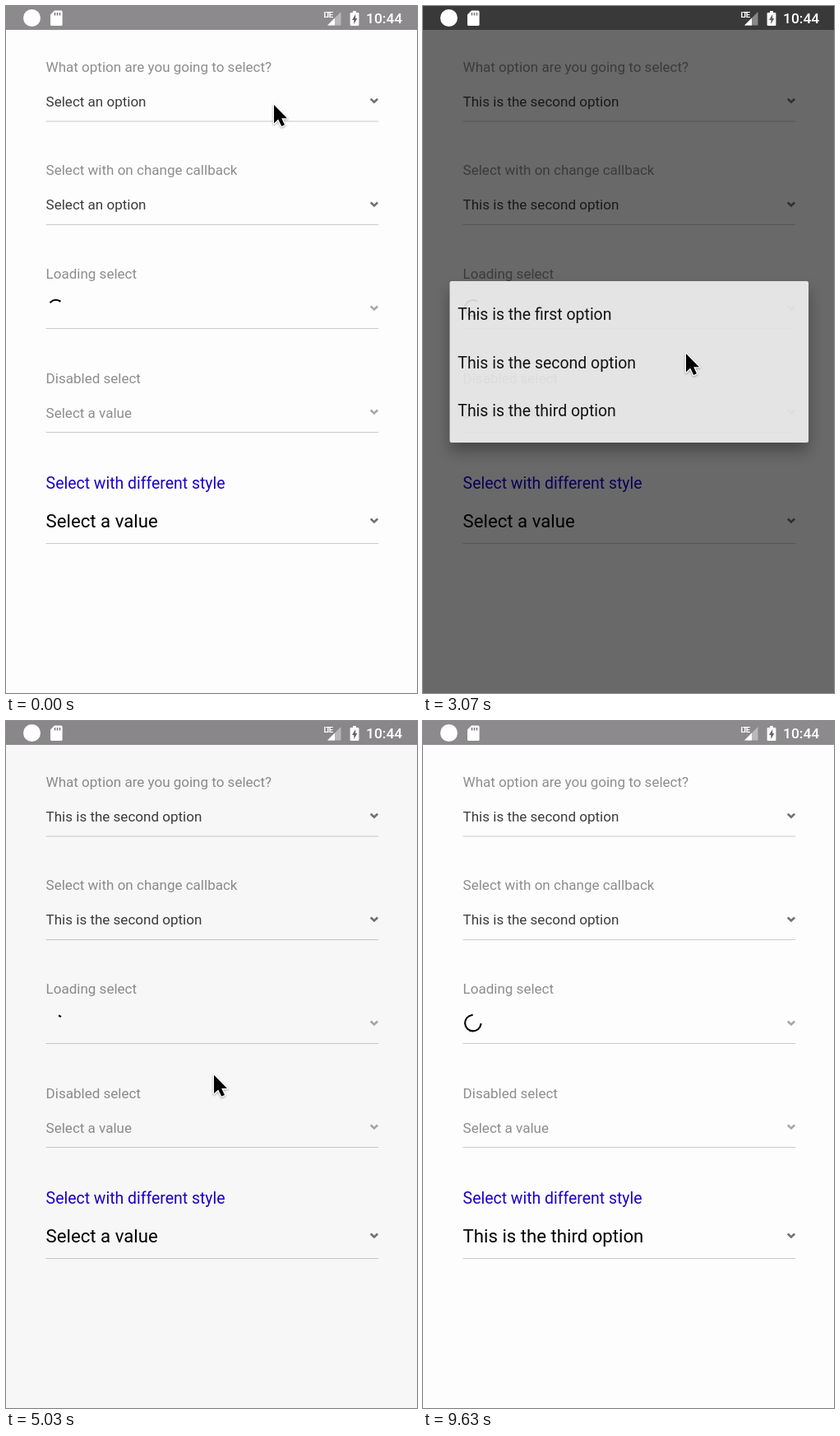
Animation, 500 px wide and 834 px high, one loop 9.71 s. Source, as an HTML page:

```html
<!DOCTYPE html>
<html lang="en">
<head>
<meta charset="utf-8">
<title>Select fields</title>
<style>
  html, body { margin: 0; width: 100%; height: 100%; overflow: hidden; background: #fefdfe; }
  svg { display: block; width: 500px; height: 834px; font-family: Roboto, "Liberation Sans", sans-serif; }
  text { font-size: 17.03px; fill: #3d3c3d; white-space: pre; }
  .label, .off { fill: #8e8d8e; }
  .styled { font-size: 19.46px; fill: #1a00c8; }
  .big { font-size: 22.2px; fill: #000; }
  .card text { font-size: 19.46px; fill: #000; }
  .card rect { fill: #fff; filter: drop-shadow(0 10px 9px rgba(0, 0, 0, .38)); }
  .chevron { fill: none; stroke: #737273; stroke-width: 2.6; }
  .chevron.dimmed { stroke: #aaa9aa; }
  .rule { stroke: #cbcacb; stroke-width: 1.2; }
  .clock { font-size: 17.4px; font-weight: 500; fill: #fff; }
  .lte { font-size: 9.5px; font-weight: 700; fill: #fff; }
</style>
</head>
<body>
<svg viewBox="0 0 500 834">
  <rect width="500" height="834" fill="#fefdfe"/>
  <rect width="500" height="29" fill="#8c8a8c"/>
  <g id="form"></g>
  <path id="spinner" fill="none" stroke="#000" stroke-width="2.1" stroke-linecap="square"/>
  <rect id="dim" width="500" height="834" opacity="0"/>

  <g fill="#fff">
    <circle cx="31.5" cy="14.5" r="10.5"/>
    <path d="M59 5.5H67a1.6 1.6 0 0 1 1.6 1.6V22.4A1.6 1.6 0 0 1 67 24H55.600a1.600 1.600 0 0 1-1.600-1.600V10.500Z"/>
    <path d="M59.500 8v3.600M62.500 8v3.600M65.500 8v3.600" stroke="#777577" stroke-width="1.500"/>
    <text class="lte" x="386.500" y="13.800" textLength="11.500" lengthAdjust="spacing">LTE</text>
    <path d="M407.500 7V23.500H391Z" opacity=".4"/>
    <path d="M400 14.500V23.500H391Z"/>
    <path d="M422 6h4v2h2.200a1.200 1.200 0 0 1 1.200 1.200V22.800a1.200 1.200 0 0 1-1.200 1.200h-8.400a1.200 1.200 0 0 1-1.200-1.200V9.200a1.200 1.200 0 0 1 1.200-1.200H422Z"/>
    <path d="M425.200 10l-4.200 7h2.300v5l4-7h-2.100Z" fill="#656365"/>
    <text class="clock" x="438" y="21">10:44</text>
  </g>

  <g id="list" class="card">
    <rect x="32.500" y="334" width="436.500" height="196" rx="2.500"/>
    <text x="42.300" y="380.800">This is the first option</text>
    <text x="42.300" y="439.500">This is the second option</text>
    <text x="42.300" y="498">This is the third option</text>
  </g>
  <g id="notice" class="card">
    <rect x="32.500" y="348" width="436.500" height="168" rx="2.500"/>
    <text x="61" y="398">This is the second option</text>
  </g>

  <path id="cursor" d="M0 0V22.500L5.200 17.600 9.200 26 13 24.300 9.200 16.200H16Z"
        stroke="#fff" stroke-width="2.600" stroke-linejoin="round" paint-order="stroke"
        style="filter: drop-shadow(0 1px 1px rgba(0, 0, 0, .35))"/>
</svg>
<script>
const LOOP = 9710, DIM = 0.64, DIM_MS = 250, CARD_MS = 120;
const $ = id => document.getElementById(id);
const clamp = v => Math.min(1, Math.max(0, v));

// label, value, label baseline, value baseline, chevron y, rule y, label class, value class, chevron class
const fields = [
  ["What option are you going to select?", "Select an option", 79.6, 121.8, 115, 140, "label", "", ""],
  ["Select with on change callback", "Select an option", 205.3, 247.3, 240.700, 265.5, "label", "", ""],
  ["Loading select", "", 331.2, 373, 366.700, 391.5, "label", "", "dimmed"],
  ["Disabled select", "Select a value", 457.700, 499.6, 492.700, 517.5, "label", "off", "dimmed"],
  ["Select with different style", "Select a value", 585.8, 633.2, 624.700, 652.5, "styled", "big", ""]
];
$("form").innerHTML = fields.map(([label, value, ly, vy, cy, ry, lc, vc, cc], i) => `
  <text class="${lc}" x="48.600" y="${ly}">${label}</text>
  <text class="${vc}" x="48.600" y="${vy}" id="value${i}">${value}</text>
  <path class="chevron ${cc}" d="M443.700 ${cy - 2.2}l4.200 4 4.200-4"/>
  <path class="rule" d="M48.500 ${ry}H453"/>`).join("");

// field, time of choice, chosen text
const choices = [
  [0, 1300, "This is the second option"],
  [1, 3050, "This is the second option"],
  [4, 8620, "This is the third option"]
];

// card, open, close
const modals = [
  ["list", 100, 1300], ["list", 2290, 3050], ["notice", 3760, 4790], ["list", 7300, 8620]
];

// time, x, y
const path = [
  [0, 326, 120], [120, 325, 122], [470, 275, 187], [950, 272, 423], [1350, 272, 426],
  [2170, 275, 253], [2270, 275, 253], [2730, 320, 422], [4000, 320, 422], [4350, 400, 505],
  [4630, 385, 556], [4770, 385, 556], [5030, 253, 430], [5450, 262, 379], [5850, 262, 382],
  [6350, 250, 490], [6750, 214, 630], [7200, 206, 632], [7500, 206, 657], [7760, 206, 646],
  [8170, 215, 480], [8700, 215, 480], [9400, 180, 860], [LOOP, 180, 860]
];

const slope = (i, c) => (path[i + 1][c] - path[i][c]) / (path[i + 1][0] - path[i][0]);

// Monotone tangent: still at turning points and holds.
function tangent(i, c) {
  if (i === 0 || i === path.length - 1) return 0;
  const a = slope(i - 1, c), b = slope(i, c);
  return a * b > 0 ? 2 * a * b / (a + b) : 0;
}

function along(t, c) {
  let i = 0;
  while (i < path.length - 2 && path[i + 1][0] <= t) i++;
  const h = path[i + 1][0] - path[i][0], u = (t - path[i][0]) / h;
  const s = u * u * (3 - 2 * u);
  return path[i][c] * (1 - s) + path[i + 1][c] * s +
    h * u * (1 - u) * ((1 - u) * tangent(i, c) - u * tangent(i + 1, c));
}

// Bezier (0,0) (.2,0) (.1,1) (.5,1), then flat.
function trim(x) {
  if (x <= 0) return 0;
  if (x >= 0.5) return 1;
  let lo = 0, hi = 1;
  for (let n = 0; n < 24; n++) {
    const s = (lo + hi) / 2, r = 1 - s;
    if (0.6 * r * r * s + 0.3 * r * s * s + 0.5 * s * s * s < x) lo = s; else hi = s;
  }
  return lo * lo * (3 - 2 * lo);
}

function spinnerArc(t) {
  const p = (t / 1333 + 0.13) % 1;
  const turn = 0.25 * p + 0.85 + 2 * t / 4444;
  const from = turn + 0.75 * trim(p - 0.5);
  const to = Math.max(turn + 0.75 * trim(p), from + 0.008);
  const at = a => {
    const r = a * 2 * Math.PI;
    return `${(60.8 + 9.7 * Math.sin(r)).toFixed(2)} ${(366.7 - 9.7 * Math.cos(r)).toFixed(2)}`;
  };
  return `M${at(from)}A9.7 9.7 0 ${to - from > 0.5 ? 1 : 0} 1 ${at(to)}`;
}

function draw(t) {
  const fade = { list: 0, notice: 0 };
  let dim = 0;
  for (const [card, open, close] of modals) {
    const level = ms => clamp((t - open) / ms) * (1 - clamp((t - close) / ms));
    dim = Math.max(dim, level(DIM_MS));
    fade[card] = Math.max(fade[card], level(CARD_MS));
  }
  $("dim").setAttribute("opacity", DIM * dim);
  for (const card in fade) {
    $(card).style.opacity = fade[card];
    $(card).style.display = fade[card] ? "" : "none";
  }
  for (const [i, time, text] of choices) {
    $("value" + i).textContent = t < time ? fields[i][1] : text;
  }
  $("spinner").setAttribute("d", spinnerArc(t));
  $("cursor").setAttribute("transform", `translate(${along(t, 1)} ${along(t, 2)})`);
}

const start = performance.now();
function tick() {
  draw((performance.now() - start) % LOOP);
  requestAnimationFrame(tick);
}
draw(0);
requestAnimationFrame(tick);
</script>
</body>
</html>
```
